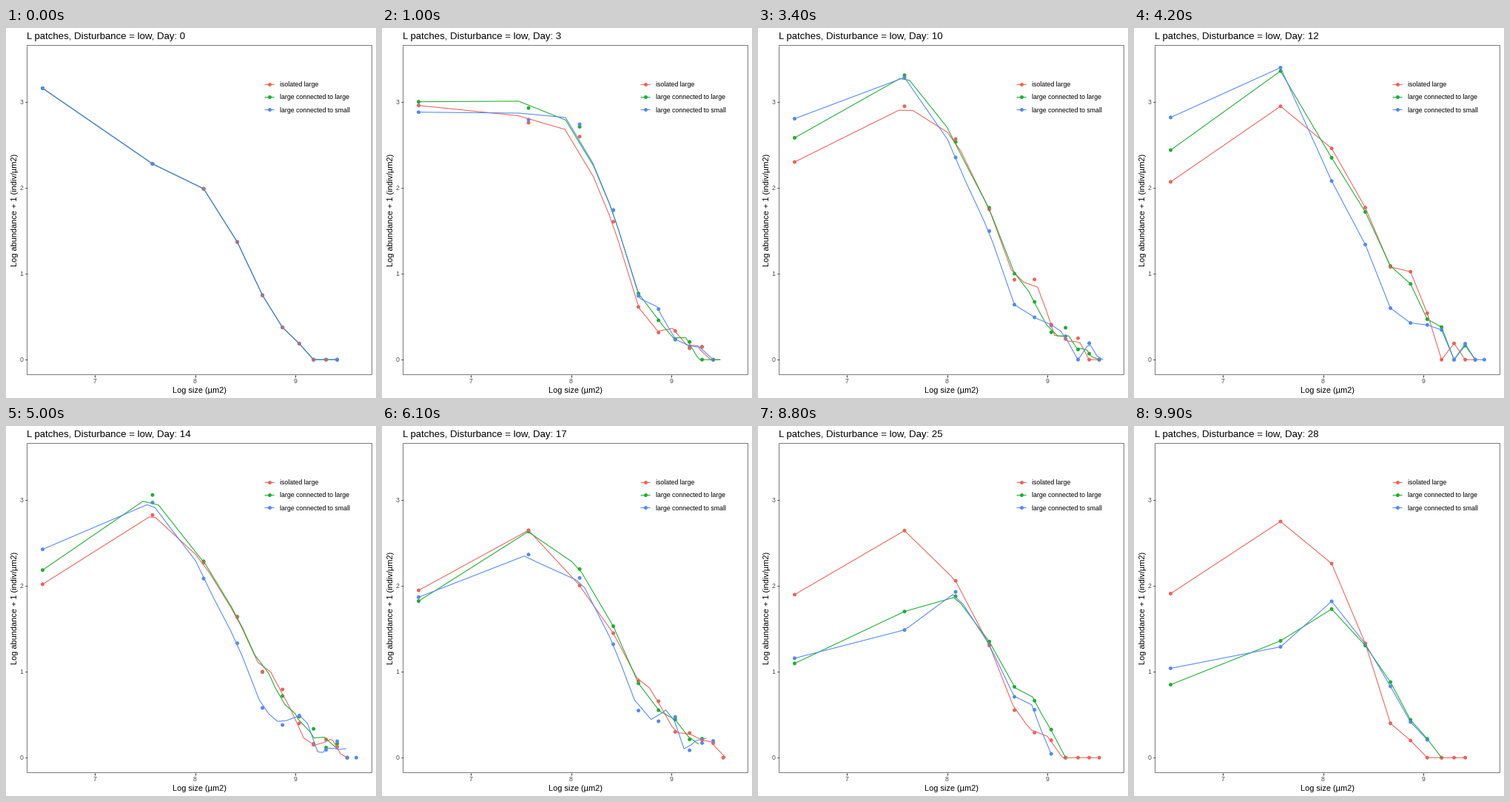
Animation of 500 by 500 pixels, one loop 10000 ms. Source, as a matplotlib script:

```python
import numpy as np
import matplotlib.pyplot as plt
from matplotlib.animation import FuncAnimation
from matplotlib.patches import Rectangle

plt.rcParams["font.family"] = ["Liberation Sans", "DejaVu Sans"]

FRAMES, LAST_DAY, BINS = 100, 28, 12
LEFT, RIGHT, TOP, BOTTOM = 28.5, 494.5, 23.5, 468.5
COLORS = ["#ed635b", "#1eae34", "#5488f7"]
NAMES = ["isolated large", "large connected to large", "large connected to small"]

# Key shapes: heights of size classes 1, 2, 3 and 5, then the class count
KEY_DAYS = (0, 4, 12, 20, 28)
START = (3.16, 2.28, 1.99, 0.75, 10)
KEYS = [
    [START, (2.88, 2.95, 2.84, 0.56, 11), (2.07, 2.95, 2.46, 1.08, 11),
     (1.88, 2.48, 1.75, 0.79, 12), (1.91, 2.75, 2.26, 0.40, 10)],
    [START, (2.94, 3.19, 3.00, 0.78, 11), (2.44, 3.36, 2.35, 1.09, 11),
     (1.48, 2.23, 2.11, 0.74, 8), (0.85, 1.36, 1.73, 0.88, 8)],
    [START, (2.77, 3.00, 3.04, 0.74, 10), (2.82, 3.40, 2.08, 0.60, 12),
     (1.34, 1.79, 2.10, 0.52, 8), (1.04, 1.29, 1.82, 0.83, 7)],
]

rng = np.random.default_rng(4)
bin_x = np.log(649.5 * (2 * np.arange(BINS) + 1))
days = np.arange(0, LAST_DAY + 1, 4)
key_frames = np.rint(days * (FRAMES - 1) / LAST_DAY).astype(int)


def to_px(x, y):
    return 120.3 + 135.2 * (x - 7), 448.2 - 116.07 * y


def sample(keys, day):
    """Abundance per size class: steep head, then a sparse noisy tail."""
    small, peak, shoulder, foot, count = (
        np.interp(day, KEY_DAYS, column) for column in zip(*keys))
    rank = np.arange(1, BINS - 4)
    spread = np.sqrt(np.sin(np.pi * day / LAST_DAY)) * (1 - rank / 8)
    tail = foot * 0.5 ** rank + spread * rng.uniform(-0.1, 0.6, rank.size)
    tail[tail < 0.15] = 0
    row = np.array([small, peak, shoulder, (shoulder + foot) / 2, foot, *tail])
    row[int(count + 1e-6):] = np.nan
    return row


SERIES = [[sample(keys, d) for d in days] for keys in KEYS]
# Dots stack in text order of their group number
STACK = sorted(((c, k) for c in range(3) for k in range(BINS)),
               key=lambda g: str(g[0] * BINS + g[1] + 1))


def path(row):
    ok = ~np.isnan(row)
    x, y = bin_x[ok], row[ok]
    s = np.concatenate([[0], np.cumsum(np.hypot(np.diff(x), np.diff(y)))])
    return s / s[-1], x, y


def blend_paths(a, b, t):
    """Blend two polylines matched by their relative arc length."""
    sa, xa, ya = path(a)
    sb, xb, yb = path(b)
    s = np.union1d(sa, sb)

    def mix(u, v):
        return (1 - t) * np.interp(s, sa, u) + t * np.interp(s, sb, v)

    return mix(xa, xb), mix(ya, yb)


def blend_dots(a, b, t):
    """Dots without a partner keep their place until the next sample."""
    return np.where(np.isnan(b), a, (1 - t) * a + t * b)


def px(size):
    return size * 0.72


fig = plt.figure(figsize=(5, 5), dpi=100, facecolor="white")
ax = fig.add_axes([0, 0, 1, 1])
ax.set(xlim=(0, 500), ylim=(500, 0))
ax.axis("off")


def label(x, y, s, size, color="black", **kw):
    return ax.text(x, y, s, fontsize=px(size), color=color, va="baseline", **kw)


def stroke(x, y, color):
    return ax.plot(x, y, color=color, lw=px(1.07), zorder=3,
                   solid_capstyle="butt", solid_joinstyle="round")[0]


ax.add_patch(Rectangle((LEFT, TOP), RIGHT - LEFT, BOTTOM - TOP, fill=False,
                       ec="#7a7a7a", lw=px(1), zorder=5, snap=False))

for v in (7, 8, 9):
    x, _ = to_px(v, 0)
    stroke([x, x], [BOTTOM, BOTTOM + 3], "#333333")
    label(x, 480.2, str(v), 8.8, "#4d4d4d", ha="center")
for v in range(4):
    _, y = to_px(7, v)
    stroke([LEFT - 3, LEFT], [y, y], "#333333")
    label(23.3, y + 3.2, str(v), 8.8, "#4d4d4d", ha="right")

label(261.5, 493, "Log size (µm2)", 11, ha="center")
label(14.8, 245.5, "Log abundance + 1 (indiv/µm2)", 11, ha="center",
      rotation=90, rotation_mode="anchor")
title = label(28, 15, "", 13.2)

DOT = px(5) ** 2
for i, (name, color) in enumerate(zip(NAMES, COLORS)):
    y = 75.9 + 17.28 * i
    stroke([348.6, 362.4], [y, y], color)
    ax.scatter([355.5], [y], s=DOT, color=color, lw=0, zorder=2)
    label(369.6, y + 3.2, name, 8.8)

dots = ax.scatter([], [], s=DOT, lw=0, zorder=2)
lines = [stroke([], [], c) for c in COLORS]


def draw(f):
    i = np.searchsorted(key_frames, f, side="right") - 1
    j = min(i + 1, len(key_frames) - 1)
    t = (f - key_frames[i]) / max(key_frames[j] - key_frames[i], 1)

    heights = []
    for rows, line in zip(SERIES, lines):
        line.set_data(*to_px(*blend_paths(rows[i], rows[j], t)))
        heights.append(blend_dots(rows[i], rows[j], t))

    shown = [(c, k) for c, k in STACK if not np.isnan(heights[c][k])]
    dots.set_offsets([to_px(bin_x[k], heights[c][k]) for c, k in shown])
    dots.set_facecolors([COLORS[c] for c, _ in shown])

    day = round(f * LAST_DAY / (FRAMES - 1))
    title.set_text(f"L patches, Disturbance = low, Day: {day}")
    return [dots, title, *lines]


anim = FuncAnimation(fig, draw, frames=FRAMES, init_func=lambda: draw(0),
                     interval=100, repeat=True, repeat_delay=0, blit=False)
plt.show()
```
